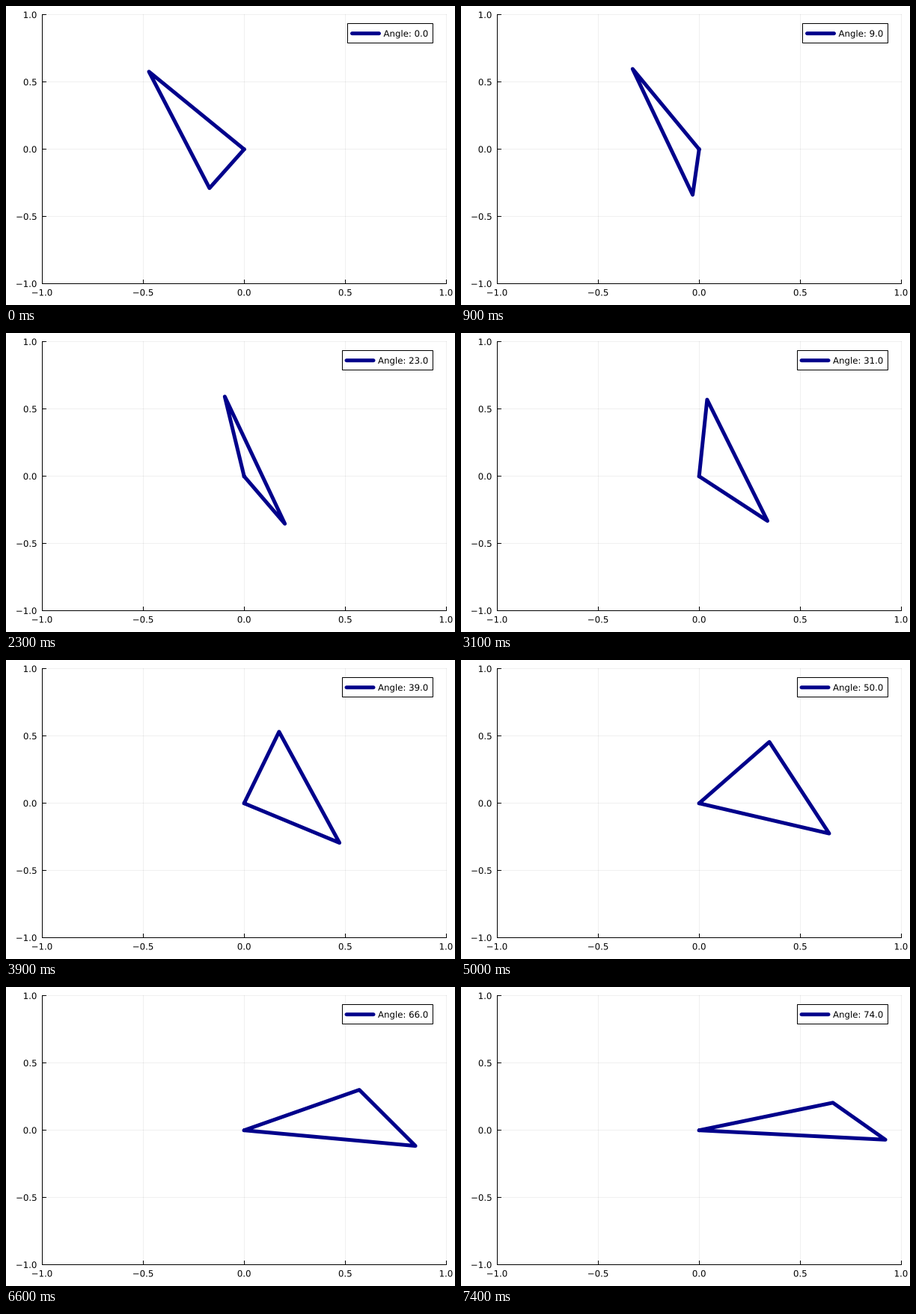
Write a matplotlib script that moves like this. It is 600 by 400 pixels and loops after 7500 ms.

```python
import numpy as np
import matplotlib.pyplot as plt
from matplotlib.animation import FuncAnimation
from matplotlib.patches import PathPatch, Rectangle
from matplotlib.textpath import TextPath
from matplotlib.transforms import Affine2D

W, H, DPI = 600, 400, 100
PX = 72 / DPI  # points per pixel
LEFT, RIGHT, TOP, BOTTOM = 48.2, 588.2, 11.8, 371.6
FONT = 11.75
NAVY = "#00008b"
FRAMES = 75

plt.rcParams["font.family"] = "DejaVu Sans"
fig = plt.figure(figsize=(W / DPI, H / DPI), dpi=DPI, facecolor="white")
ax = fig.add_axes([0, 0, 1, 1])
ax.set_xlim(0, W)
ax.set_ylim(H, 0)
ax.axis("off")


def to_px(x, y):
    return (LEFT + (x + 1) / 2 * (RIGHT - LEFT),
            BOTTOM - (y + 1) / 2 * (BOTTOM - TOP))


def crisp(v):
    """Centre of the pixel that holds v."""
    return np.floor(v) + 0.5


def rule(xs, ys, z=2, **kw):
    ax.plot(crisp(xs), crisp(ys), color="black", lw=PX, snap=False,
            zorder=z, **kw)


def thick(z):
    return ax.plot([], [], color=NAVY, lw=5 * PX, zorder=z, snap=False,
                   solid_capstyle="round", solid_joinstyle="round")[0]


def text_path(s, x, y, anchor=0):
    """Text outline; anchor 0 is left, 0.5 centre, 1 right."""
    path = TextPath((0, 0), s, size=FONT)
    shift = anchor * path.get_extents().x1
    if anchor == 0.5:
        shift += path.get_extents().x0 / 2
    return Affine2D().translate(-shift, 0).scale(1, -1).translate(
        x, y).transform_path(path)


def write(path, z=2):
    return ax.add_patch(PathPatch(path, fc="black", lw=0, zorder=z))


# Grid, ticks and labels
for v in (-1, -0.5, 0, 0.5, 1):
    x, y = to_px(v, v)
    rule([x, x], [TOP, BOTTOM], z=1, alpha=0.06)
    rule([LEFT, RIGHT], [y, y], z=1, alpha=0.06)
    rule([x, x], [BOTTOM, BOTTOM - 4.8])
    rule([LEFT, LEFT + 4.8], [y, y])
    label = f"{v:.1f}".replace("-", "\u2212")
    write(text_path(label, x, 387.5, 0.5))
    write(text_path(label, 40.6, y + 4.3, 1))
rule([LEFT, LEFT, RIGHT], [TOP, BOTTOM, BOTTOM])


def upper(c, s, c2):
    return (-0.0953 - 0.3557 * c + 0.8721 * s - 0.020 * c2,
            -0.2325 + 0.8399 * c + 0.1879 * s - 0.030 * c2)


def lower(c, s, c2):
    return (0.0456 - 0.1100 * c + 0.8488 * s - 0.107 * c2,
            0.1059 - 0.0999 * c - 0.4146 * s - 0.295 * c2)


triangle = thick(3)
box = ax.add_patch(Rectangle((0, crisp(23.8)), 1, 26, fc="white", ec="black",
                             lw=PX, snap=False, zorder=4))
key = thick(5)
caption = write(text_path("A", 0, 0), 5)


def draw(n):
    a = np.radians(n)
    waves = np.cos(a), np.sin(a), np.cos(2 * a)
    corners = (0, 0), upper(*waves), lower(*waves), (0, 0)
    triangle.set_data(*zip(*(to_px(*p) for p in corners)))

    # The legend grows leftwards by one digit's width
    left = 456.5 - 0.636 * FONT * (len(str(n)) - 1)
    box.set_x(crisp(left))
    box.set_width(crisp(570.2) - crisp(left))
    key.set_data([left + 6, left + 42], [36.7, 36.7])
    caption.set_path(text_path(f"Angle: {n:.1f}", left + 48, 41))
    return triangle, box, key, caption


anim = FuncAnimation(fig, draw, frames=FRAMES, interval=100,
                     repeat=True, repeat_delay=0, blit=False)
plt.show()
```
